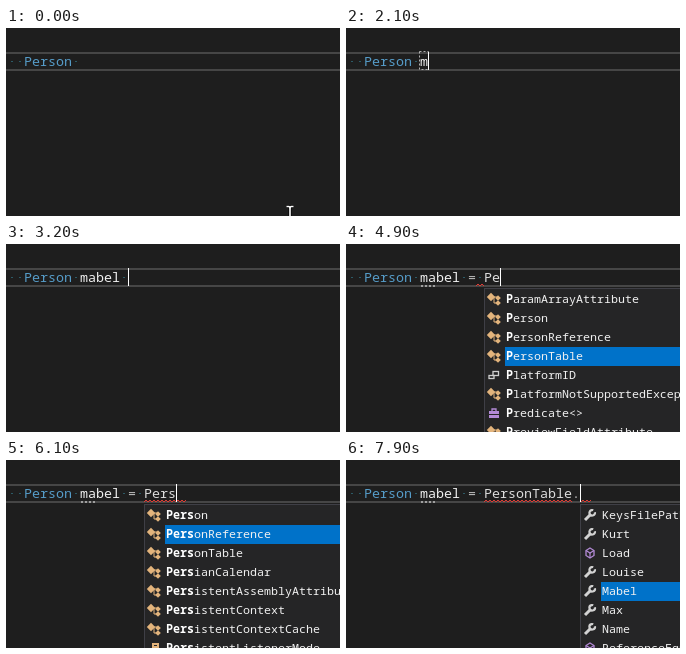
An HTML page with a canvas that plays this animation: 334 by 188 pixels, repeating every 8 s.

```html
<!DOCTYPE html>
<html lang="en">
<head>
<meta charset="utf-8">
<title>Code completion</title>
<style>
html, body { margin: 0; width: 100%; height: 100%; overflow: hidden; background: #1e1e1e; }
canvas { display: block; width: 334px; height: 188px; }
</style>
</head>
<body>
<canvas id="stage" width="334" height="188"></canvas>
<script>
const ctx = document.getElementById('stage').getContext('2d');
const W = 334, H = 188, LOOP = 8000;
const CELL = 8, START = 74, ROW = 19, LIST_TOP = 46;
const MONO = '"Noto Sans Mono", "DejaVu Sans Mono", monospace';
const CODE_FONT = `${CELL / 0.6}px ${MONO}`;
const LIST_FONT = `${7 / 0.6}px ${MONO}`;

const typing = [
  [0, ''], [2100, 'm'], [2300, 'ma'], [2500, 'mab'], [2800, 'mabe'], [3000, 'mabel'],
  [3200, 'mabel '], [3500, 'mabel ='], [3600, 'mabel = '], [4700, 'mabel = P'],
  [4900, 'mabel = Pe'], [5100, 'mabel = Per'], [5300, 'mabel = Pers'],
  [7100, 'mabel = PersonTable'], [7600, 'mabel = PersonTable.']
];
const caretShown = [[0, false], [1100, true], [1600, false], [2100, true], [6200, false], [6700, true]];

// Each item is an icon name and a label.
const broadList = [
  ['type', 'ParamArrayAttribute'], ['type', 'Person'], ['type', 'PersonReference'],
  ['type', 'PersonTable'], ['struct', 'PlatformID'], ['type', 'PlatformNotSupportedException'],
  ['delegate', 'Predicate<>'], ['type', 'PreviewFieldAttribute']
];
const narrowList = [
  ['type', 'Person'], ['type', 'PersonReference'], ['type', 'PersonTable'],
  ['type', 'PersianCalendar'], ['type', 'PersistentAssemblyAttribute'],
  ['type', 'PersistentContext'], ['type', 'PersistentContextCache'], ['enum', 'PersistentListenerMode']
];
const memberList = [
  ['wrench', 'KeysFilePath'], ['wrench', 'Kurt'], ['cube', 'Load'], ['wrench', 'Louise'],
  ['wrench', 'Mabel'], ['wrench', 'Max'], ['wrench', 'Name'], ['cube', 'ReferenceEquals']
];

const at = (steps, t) => steps.reduce((value, step) => t >= step[0] ? step[1] : value, steps[0][1]);

function rect(x, y, w, h, color) {
  ctx.fillStyle = color;
  ctx.fillRect(x, y, w, h);
}

function path(points, color, width = 1, close = false) {
  ctx.beginPath();
  points.forEach(([x, y], i) => i ? ctx.lineTo(x, y) : ctx.moveTo(x, y));
  if (close) ctx.closePath();
  ctx.strokeStyle = color;
  ctx.lineWidth = width;
  ctx.stroke();
}

function label(str, x, y, font, color) {
  ctx.font = font;
  ctx.fillStyle = color;
  ctx.fillText(str, x, y);
}

function code(str, x, color) {
  label(str, x, 38, CODE_FONT, color);
}

function space(x) {
  rect(x + 3, 33, 2, 1, '#2c5a66');
}

function squiggle(from, to) {
  const points = [];
  for (let x = from, i = 0; x <= to; x += 2, i++) points.push([x, i % 2 ? 40 : 42]);
  path(points, '#e03a32');
}

function diamond(x, y, r, color) {
  ctx.fillStyle = color;
  ctx.beginPath();
  ctx.moveTo(x, y - r);
  ctx.lineTo(x + r, y);
  ctx.lineTo(x, y + r);
  ctx.lineTo(x - r, y);
  ctx.fill();
}

const icons = {
  type(x, y) {
    const c = '#e3b47c';
    path([[x - 2, y - 2], [x + 3, y - 2]], c);
    path([[x, y - 2], [x, y + 4], [x + 3, y + 4]], c);
    diamond(x - 3, y - 2, 4.2, c);
    diamond(x + 4, y - 1, 2.8, c);
    diamond(x + 4, y + 4, 2.8, c);
  },
  struct(x, y) {
    ctx.strokeStyle = '#d0d0d0';
    ctx.lineWidth = 1.3;
    ctx.strokeRect(x - 1, y - 3.5, 5.5, 4);
    ctx.strokeRect(x - 5, y + 0.5, 5, 3);
  },
  enum(x, y) {
    rect(x - 2, y - 5, 7, 10, '#e3b47c');
    rect(x, y - 3, 3, 1, '#252526');
    rect(x, y, 3, 1, '#252526');
  },
  delegate(x, y) {
    const c = '#b38ad6';
    rect(x - 5, y - 2, 10, 7, c);
    path([[x - 2, y - 2], [x - 2, y - 4], [x + 2, y - 4], [x + 2, y - 2]], c, 1.3);
    rect(x - 5, y + 1, 10, 1, '#252526');
  },
  wrench(x, y) {
    path([[x - 5, y + 5], [x + 1, y - 1]], '#d2d2d2', 3);
    ctx.beginPath();
    ctx.arc(x + 2.2, y - 2.2, 2.8, -0.2, Math.PI * 1.62);
    ctx.lineWidth = 2.2;
    ctx.stroke();
  },
  cube(x, y) {
    const c = '#b38ad6';
    path([[x, y - 5], [x + 4, y - 2.5], [x + 4, y + 2.5], [x, y + 5], [x - 4, y + 2.5], [x - 4, y - 2.5]], c, 1.3, true);
    path([[x - 4, y - 2.5], [x, y], [x + 4, y - 2.5]], c, 1.2);
    path([[x, y], [x, y + 5]], c, 1.2);
  }
};

function popup(x, items, selected, bold = 0, right = W + 2, bottom = H + 2) {
  rect(x, 44, right - x, bottom - 44, '#3f3f46');
  rect(x + 1, 45, right - x - 2, bottom - 46, '#252526');
  items.forEach(([icon, name], i) => {
    const top = LIST_TOP + i * ROW, base = top + 13;
    if (i === selected) rect(x + 21, top, right - x - 22, ROW, '#0072c9');
    icons[icon](x + 10, top + 9);
    label(name.slice(0, bold), x + 22, base, 'bold ' + LIST_FONT, '#ffffff');
    label(name.slice(bold), x + 22 + bold * 7, base, LIST_FONT, '#f1f1f1');
  });
}

function namePopup(word) {
  popup(START, [['cube', word], ['cube', 'person'], ['cube', 'Person'], ['cube', 'newPerson']], -1, 0, 179, 154);
  ctx.strokeStyle = '#0072c9';
  ctx.lineWidth = 1;
  ctx.strokeRect(START + 21.5, LIST_TOP + 0.5, 82, ROW - 2);
}

function pointer(t) {
  if (t >= 2100) return;
  const p = Math.min(1, t / 900), ease = p * p * (3 - 2 * p);
  const slide = Math.max(0, Math.min(1, (t - 900) / 300));
  const x = Math.round(284 - 184 * ease - 22 * slide);
  const y = Math.round(188 - 154 * ease);
  const beam = [[x - 3.5, y - 9.5], [x - 1, y - 9.5], [x, y - 8.5], [x + 1, y - 9.5], [x + 3.5, y - 9.5]];
  const foot = beam.map(([a, b]) => [a, 2 * y - b]);
  for (const [color, width] of [['#000', 3], ['#fff', 1.6]]) {
    path(beam, color, width);
    path(foot, color, width);
    path([[x, y - 8.5], [x, y + 8.5]], color, width);
  }
}

function editor(t, text) {
  rect(0, 24, W, 2, '#464646');
  rect(0, 41, W, 2, '#464646');
  [2, 10, 66].forEach(space);
  code('Person', 18, '#569cc8');
  const [name, sign = '', value = ''] = text.split(' ');
  code(name, START, '#f0f0f0');
  if (text.length > 5) space(114);
  code(sign, 122, '#c0c0c0');
  if (text.length > 7) space(130);
  code(value.replace('.', ''), 138, '#dcdcdc');
  if (value.endsWith('.')) code('.', 226, t < 7900 ? '#dcdcdc' : '#b4b4b4');

  if (t >= 4600) {
    for (let x = 75; x < 91; x += 4) rect(x, 41, 2, 2, '#a0a0a0');
    if (t < 6100) squiggle(130, 138);
    else if (t < 7100) squiggle(138, 181);
    else squiggle(138, 227);
    if (t >= 7600) squiggle(235, 245);
  }
  if (t >= 2100 && t < 3100) {
    ctx.setLineDash([2, 2]);
    ctx.strokeStyle = '#b0b0b0';
    ctx.lineWidth = 1;
    ctx.strokeRect(73.5, 23.5, name.length * CELL + 1, 18);
    ctx.setLineDash([]);
  }
  if (at(caretShown, t)) rect(START + text.length * CELL, 24, 1, 18, '#ffffff');
}

function draw(t) {
  const text = at(typing, t);
  rect(0, 0, W, H, '#1e1e1e');
  editor(t, text);
  if (t >= 2200 && t < 3100) namePopup(text);
  else if (t >= 4900 && t < 5100) popup(138, broadList, 3, 1);
  else if (t >= 5100 && t < 7100) popup(138, narrowList, t < 6100 ? 0 : t < 6300 ? 1 : 2, text.length - 8);
  else if (t >= 7600) popup(234, memberList, 4);
  pointer(t);
}

const began = performance.now();
function tick() {
  const t = (performance.now() - began) % LOOP;
  draw(Math.floor(t / 100) * 100);
  requestAnimationFrame(tick);
}
tick();
</script>
</body>
</html>
```
